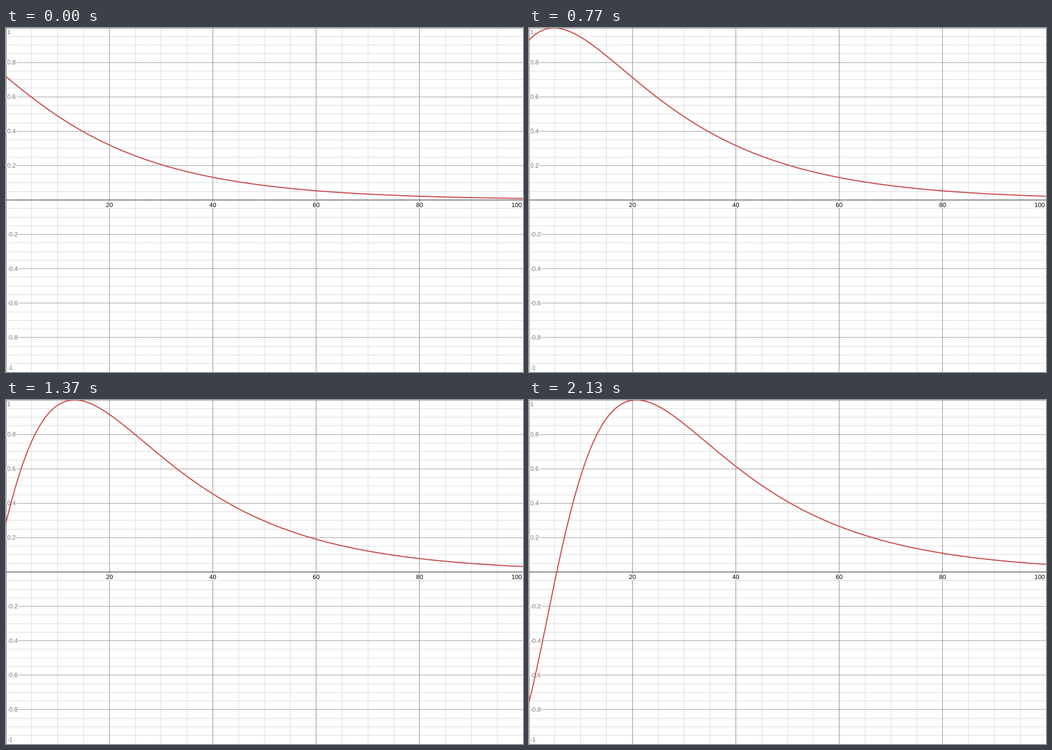
These frames come from a looping animation (916x611 px, 2160 ms). A matplotlib script:

```python
import matplotlib.pyplot as plt
import numpy as np
from matplotlib.animation import FuncAnimation
from matplotlib.collections import LineCollection
from matplotlib.patheffects import withStroke

W, H, DPI = 916, 611, 100
TICK = 10      # ms per animation frame
LOOP = 2160    # ms per loop
PX = 72 / DPI  # one pixel in points

plt.rcParams["font.family"] = "Liberation Sans"
fig = plt.figure(figsize=(W / DPI, H / DPI), dpi=DPI, facecolor="white")
ax = fig.add_axes([0, 0, 1, 1])
ax.set_xlim(0, W)
ax.set_ylim(H, 0)
ax.axis("off")


def to_x(x):
    return x * W / 100


def to_y(y):
    return (1 - y) * H / 2


def grid(xs, ys, color_v, color_h):
    # lines sit on pixel centres, so snapping stays off
    cols = np.floor([to_x(x) for x in xs]) + 0.5
    rows = np.floor([to_y(y) + 1e-6 for y in ys]) + 0.5
    across = [[(0, r), (W, r)] for r in rows]
    down = [[(c, 0), (c, H)] for c in cols]
    for lines, color in ((across, color_h), (down, color_v)):
        ax.add_collection(LineCollection(lines, colors=color, linewidths=PX,
                                         snap=False))


def label(x, baseline, text, color, ha):
    ax.text(x, baseline, text, color=color, ha=ha, va="baseline",
            fontsize=11 * PX, zorder=4,
            path_effects=[withStroke(linewidth=4 * PX, foreground="white")])


grid(np.arange(5, 100, 5), np.arange(-19, 20) / 20, "#dcdcdc", "#dcdcdc")
grid(np.arange(0, 100, 20), np.arange(-4, 6) / 5, "#909090", "#a2a2a2")
ax.plot([0, W], [H / 2, H / 2], color="#262626", lw=PX, zorder=3, snap=False)

for n in range(-5, 6):
    if n:
        base = np.clip(to_y(n / 5) + 3.5, 11, H - 4)
        label(2, base, f"{n / 5:g}", "#757575", "left")
for x in range(20, 100, 20):
    label(to_x(x), 318, str(x), "black", "center")
label(W - 2, 318, "100", "black", "right")

xs = np.linspace(-0.5, 100.5, 500)
curve, = ax.plot([], [], color="#c94a46", lw=1.9 * PX, zorder=5, snap=False)


def update(i):
    # the amplitude steps 30 times a second
    step = (i * TICK + 5) * 3 // 100
    amp = 0.8 + 0.05 * step
    curve.set_data(to_x(xs), to_y(np.sin(amp * np.exp(-0.045 * xs))))
    return curve,


anim = FuncAnimation(fig, update, frames=LOOP // TICK, interval=TICK,
                     repeat=True, repeat_delay=0, blit=True)
plt.show()
```
